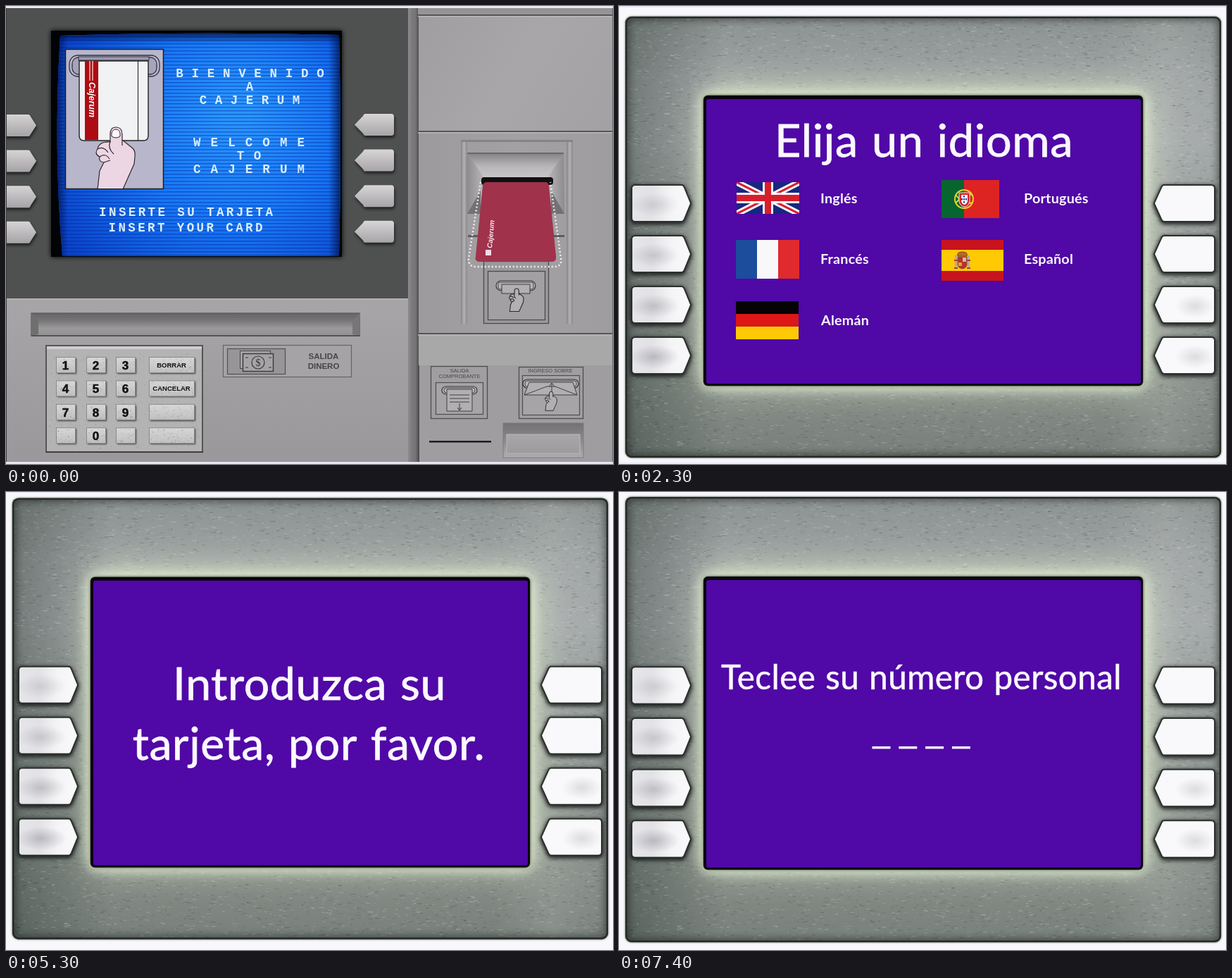
An HTML page with a canvas that plays this animation: 862x650 px, repeating every 8000 ms.

```html
<!DOCTYPE html>
<html lang="es">
<head>
<meta charset="utf-8">
<title>Cajero</title>
<style>
html, body { margin: 0; width: 100%; height: 100%; overflow: hidden; background: #f8f8fb; }
canvas { display: block; width: 862px; height: 650px; }
</style>
</head>
<body>
<canvas id="stage" width="862" height="650"></canvas>
<script>
const W = 862, H = 650, LOOP = 8000;
const BRAND = 'Cajerum';
let c;

function scene(draw) {
  const layer = document.createElement('canvas');
  layer.width = W;
  layer.height = H;
  c = layer.getContext('2d');
  draw();
  return layer;
}

function random(seed) {
  return () => {
    seed = (seed * 1664525 + 1013904223) % 4294967296;
    return seed / 4294967296;
  };
}

function blend(x0, y0, x1, y1, ...colors) {
  const g = c.createLinearGradient(x0, y0, x1, y1);
  colors.forEach((color, i) => g.addColorStop(i / (colors.length - 1), color));
  return g;
}

function rect(x, y, w, h, fill, stroke, line = 1) {
  if (fill) { c.fillStyle = fill; c.fillRect(x, y, w, h); }
  if (stroke) { c.strokeStyle = stroke; c.lineWidth = line; c.strokeRect(x, y, w, h); }
}

function shape(path, fill, stroke, line = 1) {
  const p = typeof path === 'string' ? new Path2D(path) : path;
  if (fill) { c.fillStyle = fill; c.fill(p); }
  if (stroke) { c.strokeStyle = stroke; c.lineWidth = line; c.stroke(p); }
}

function round(x, y, w, h, r) {
  const p = new Path2D();
  p.roundRect(x, y, w, h, r);
  return p;
}

function at(x, y, scale, draw, angle = 0) {
  c.save();
  c.translate(x, y);
  c.rotate(angle);
  c.scale(scale, scale);
  draw();
  c.restore();
}

function shadowed(color, blur, dx, dy, draw) {
  c.save();
  c.shadowColor = color;
  c.shadowBlur = blur;
  c.shadowOffsetX = dx;
  c.shadowOffsetY = dy;
  draw();
  c.restore();
}

function text(str, x, y, font, color, align = 'left') {
  c.font = font;
  c.fillStyle = color;
  c.textAlign = align;
  c.fillText(str, x, y);
}

function speckle(count, x, y, w, h, length, alpha, seed) {
  const rnd = random(seed);
  for (let i = 0; i < count; i++) {
    const tone = rnd() < 0.5 ? '255,255,255' : '25,35,32';
    c.fillStyle = `rgba(${tone},${rnd() * alpha})`;
    c.fillRect(x + rnd() * w, y + rnd() * h, 1 + rnd() * length, 1.3);
  }
}

// ---------- close-up of the display ----------

function label(str, x, y, size, weight = 400, align = 'left') {
  c.letterSpacing = size * 0.009 + 'px';
  c.wordSpacing = size * 0.025 + 'px';
  text(str, x, y, `${weight} ${size * 0.9}px Lato, sans-serif`, '#fbf8ff', align);
  if (weight === 400) {
    c.strokeStyle = '#fbf8ff';
    c.lineWidth = size * 0.011;
    c.strokeText(str, x, y);
  }
  c.letterSpacing = c.wordSpacing = '0px';
}

function pointer(base, shoulder, tip, y, h) {
  const d = Math.sign(tip - base) * 4;
  return `M${base + d} ${y}H${shoulder - d / 2}Q${shoulder} ${y} ${shoulder + d / 4} ${y + 3}` +
    `L${tip} ${y + h / 2}L${shoulder + d / 4} ${y + h - 3}Q${shoulder} ${y + h} ${shoulder - d / 2} ${y + h}` +
    `H${base + d}Q${base} ${y + h} ${base} ${y + h - 4}V${y + 4}Q${base} ${y} ${base + d} ${y}Z`;
}

function smudge(x, y, rx, ry, alpha) {
  c.save();
  c.translate(x, y);
  c.scale(rx, ry);
  const g = c.createRadialGradient(0, 0, 0, 0, 0, 1);
  g.addColorStop(0, `rgba(120,120,130,${alpha})`);
  g.addColorStop(1, 'rgba(120,120,130,0)');
  rect(-1, -1, 2, 2, g);
  c.restore();
}

function displayButtons() {
  for (let i = 0; i < 4; i++) {
    const y = 255 + i * 72;
    const left = pointer(19, 91, 101, y, 50);
    const right = pointer(845, 772, 761, y, 50);
    shadowed('#0e1210', 6, 0, 2, () => {
      shape(left, '#e6e6e8', '#2b302c', 4);
      shape(right, '#f9f9fb', '#2b302c', 4);
    });
    shape(left, blend(19, y, 101, y, '#e6e6ea', '#e2e2e6', '#f4f4f6', '#fafafc'));
    shape(right, '#f9f9fb');
    c.save();
    c.clip(new Path2D(left));
    smudge(50, y + 27, 36, 17, 0.22 + i * 0.06);
    c.restore();
    if (i > 1) smudge(818, y + 27, 28, 17, 0.22);
  }
}

function panel(top, scale) {
  rect(0, 0, W, H, '#f8f8fb');
  c.save();
  c.translate(0, top);
  c.scale(1, scale);
  const body = round(9, 15, 846, 626, 9);
  shadowed('#333a36', 3, 0, 0, () => shape(body, '#8c9290'));
  c.save();
  c.clip(body);
  rect(0, 0, W, H, blend(0, 14, 0, 642,
    '#8b9190', '#9fa3a4', '#a4a8a9', '#989d9c', '#8f9592', '#8b918d', '#858c87', '#78807b'));
  rect(0, 0, 150, H, blend(0, 0, 150, 0, 'rgba(35,50,43,.4)', 'rgba(35,50,43,.2)', 'rgba(35,50,43,0)'));
  rect(690, 0, 172, H, blend(690, 0, 862, 0, 'rgba(215,220,215,0)', 'rgba(215,220,215,.16)', 'rgba(190,196,192,0)'));
  speckle(15000, 0, 14, W, 630, 6, 0.2, 7);
  shadowed('#0d110f', 12, 0, 0, () => shape(body, null, '#262b28', 5));
  c.restore();
  const screen = round(120, 127, 624, 412, 6);
  shadowed('rgba(222,240,200,.8)', 50, 6, -6, () => shape(screen, '#dfebcf'));
  shadowed('rgba(240,250,225,.9)', 18, 0, 0, () => shape(screen, '#dfebcf', '#d9e6c8', 5));
  shadowed('#0c1408', 4, 0, 0, () => shape(screen, '#09040f'));
  shape(round(124, 132, 617, 404, 3), '#5008a6');
  displayButtons();
  c.restore();
}

function bands(x, y, w, h, colors, vertical) {
  const n = colors.length;
  colors.forEach((color, i) => vertical
    ? rect(x + w * i / n, y, w / n, h, color)
    : rect(x, y + h * i / n, w, h / n, color));
}

function unionFlag(x, y, w, h) {
  c.save();
  c.beginPath();
  c.rect(x, y, w, h);
  c.clip();
  rect(x, y, w, h, '#172780');
  const diagonals = `M${x} ${y}l${w} ${h}M${x + w} ${y}l${-w} ${h}`;
  const cross = `M${x + w / 2} ${y}v${h}M${x} ${y + h / 2}h${w}`;
  shape(diagonals, null, '#f7f7fa', 9);
  shape(diagonals, null, '#d81e2c', 3);
  shape(cross, null, '#f7f7fa', 15);
  shape(cross, null, '#d81e2c', 9);
  c.restore();
}

function portugal() {
  rect(458, 247, 82, 54, '#de2323');
  rect(458, 247, 32, 54, '#07652f');
  shape('M477 274a13 13 0 1 0 26 0a13 13 0 1 0-26 0M478 268q12 15 24 11M478 280q12-15 24-12', null, '#e8d32a', 2);
  shape('M483 265h15v12q-1 7-7.5 8q-6.500-1-7.500-8z', '#d9222b', '#f3e9d7', 1);
  shape('M486 268h9v9q-1 4-4.500 5q-3.500-1-4.500-5z', '#f8f8fa');
  for (const [x, y] of [[490, 269], [487, 273], [490, 273], [493, 273], [490, 277]]) rect(x - 1, y, 2, 2.5, '#23439b');
}

function spain() {
  rect(458, 332, 88, 58, '#c8131f');
  rect(458, 346, 88, 30, '#ffc904');
  rect(477, 354, 3, 18, '#bda99a');
  rect(495, 354, 3, 18, '#bda99a');
  shape('M476 361h5M494 361h5M476 372h5M494 372h5', null, '#a8402c', 2);
  shape('M481 356h13v12q-1 4-6.500 5q-5.500-1-6.500-5z', '#b6322c', '#8a5a2d');
  rect(488, 357, 5, 6, '#d6b7b0');
  rect(482, 364, 5, 5, '#e0a51d');
  shape('M481 355q-2-6 6.500-6q8.500 0 6.500 6z', '#b8672a', '#8a4223');
}

function languages() {
  panel(0, 1);
  rect(0, 0, W, 2, '#e9e6f5');
  rect(0, 647, W, 3, '#f0eef8');
  label('Elija un idioma', 433, 214, 72, 400, 'center');
  unionFlag(167, 250, 89, 45);
  bands(166, 332, 90, 55, ['#1c4d9d', '#f8f8fb', '#e02a2d'], true);
  bands(166, 419, 89, 54, ['#050304', '#dd1717', '#ffca05']);
  portugal();
  spain();
  label('Inglés', 286, 280, 22, 700);
  label('Francés', 286, 366, 22, 700);
  label('Alemán', 287, 453, 22, 700);
  label('Portugués', 575, 280, 22, 700);
  label('Español', 575, 366, 22, 700);
}

function insertCard() {
  panel(-6.3, 1);
  rect(0, 0, W, 1, '#e9e6f5');
  label('Introduzca su', 431, 295, 71.5, 400, 'center');
  label('tarjeta, por favor.', 430, 380, 71.5, 400, 'center');
}

function enterNumber() {
  panel(-8.2, 1.0097);
  label('Teclee su número personal', 429.5, 280, 52.8, 400, 'center');
  for (let i = 0; i < 4; i++) rect(359.5 + i * 37.8, 361, 26, 3.5, '#fbf8ff');
}

// ---------- the whole machine ----------

function mono(str, cx, y, pitch) {
  c.font = 'bold 17.5px "Liberation Mono", monospace';
  const advance = c.measureText('M').width;
  c.letterSpacing = pitch - advance + 'px';
  text(str, cx - (pitch * (str.length - 1) + advance) / 2, y, c.font, '#d9eeff');
  c.letterSpacing = '0px';
}

function hand(fill, line) {
  shape('M-8 10Q-8 0 0 0Q9 0 9 10V18L24 30Q28 34 27 42L26 52L10 88H-26L-23 62L-17 50Q-25 49-23 42Q-31 38-26 31Q-24 20-8 21Z',
    fill, '#30282d', line);
  shape('M-26 31Q-18 26-11 36M-23 42Q-15 36-9 45M-17 50L-8 47M-8 20Q-12 30-3 38M9 18V26', null, '#30282d', line);
}

function slotIcon(x, y, w, h) {
  shape(round(x, y, w, h, h / 2), '#b7b5b7', '#333', 1.2);
  shape(round(x + 3, y + 2, w - 6, h - 4, 3), null, '#444');
}

function screen() {
  shadowed('#000', 7, 0, 0, () => rect(64, 35, 413, 321, '#020306'));
  c.save();
  c.clip(new Path2D('M77 42Q270 36 473 41Q477 200 473 355H80Q67 200 77 42Z'));
  rect(60, 33, 420, 324, '#0a50df');
  const glow = c.createRadialGradient(330, 150, 20, 310, 190, 270);
  glow.addColorStop(0, '#2895ff');
  glow.addColorStop(0.5, '#1775f5');
  glow.addColorStop(1, '#0943c9');
  rect(60, 33, 420, 324, glow);
  for (let y = 38; y < 357; y += 5) rect(60, y, 420, 1.5, 'rgba(4,30,140,.42)');
  rect(60, 33, 420, 20, blend(0, 38, 0, 53, 'rgba(0,8,50,.75)', 'rgba(0,8,50,0)'));
  rect(68, 33, 20, 324, blend(68, 0, 88, 0, 'rgba(0,8,50,.8)', 'rgba(0,8,50,0)'));
  rect(458, 33, 20, 324, blend(458, 0, 477, 0, 'rgba(0,8,50,0)', 'rgba(0,8,50,.75)'));
  c.restore();

  rect(84.5, 61.5, 139, 198, '#b8b6ca', '#1c1c26', 1.5);
  shape(round(90, 70, 128, 30, 12), null, '#333344', 1.3);
  shape(round(94, 73, 120, 24, 9), '#a6a4ba', '#333344', 1.3);
  rect(103, 72, 100, 5, '#9d9bb0', '#333344');
  shape('M104 78H202V184Q202 191 195 191H111Q104 191 104 184Z', '#f1f2f3', '#222', 1.4);
  rect(112, 78, 19, 112, '#ad0d12');
  rect(118, 78, 2, 28, '#e58d8d');
  rect(122, 78, 2, 28, '#e58d8d');
  shape('M187.500 78V191', null, '#333', 1.2);
  at(118, 108, 1, () => text(BRAND, 0, 0, 'italic bold 12.5px "Liberation Sans", sans-serif', '#fff'), Math.PI / 2);
  c.save();
  c.beginPath();
  c.rect(85, 61, 138, 198);
  c.clip();
  at(156, 172, 1, () => hand('#ecd6e3', 1.2));
  shape('M150 181a6 6 0 1 1 12 0v4q-6 4-12 0z', '#fbf7fa', '#30282d', 1);
  c.restore();

  const name = BRAND.toUpperCase();
  mono('BIENVENIDO', 346.5, 101, 22.2);
  mono('A', 346, 120, 22);
  mono(name, 346, 139, 22);
  mono('WELCOME', 345, 199, 24.6);
  mono('TO', 345, 218, 24);
  mono(name, 345, 237, 24.6);
  mono('INSERTE SU TARJETA', 255.5, 298, 13.9);
  mono('INSERT YOUR CARD', 255, 320, 13.9);
}

function sideButtons() {
  for (let i = 0; i < 4; i++) {
    const y = 154 + i * 50.6;
    shadowed('#1c1e1d', 4, 1, 3, () => {
      shape(pointer(-6, 34, 43, y, 31), blend(0, y, 0, y + 31, '#d6d4d5', '#bdbbbd', '#a5a3a5'));
      shape(pointer(551, 508, 495, y - 1, 31), blend(0, y, 0, y + 31, '#d6d4d5', '#bdbbbd', '#a5a3a5'));
    });
  }
}

function keypad() {
  rect(57, 482, 222, 151, '#b4b3b3', '#565556', 2);
  rect(58, 483, 220, 4, '#cfcdce');
  rect(57, 632, 223, 2, '#3e3e3e');
  speckle(900, 59, 487, 218, 143, 1, 0.13, 21);
  const keys = ['1', '2', '3', 'BORRAR', '4', '5', '6', 'CANCELAR', '7', '8', '9', '', '', '0', '', ''];
  keys.forEach((key, i) => {
    const col = i % 4, y = 498 + Math.floor(i / 4) * 33.4;
    const x = [71, 114, 156, 203][col], w = col < 3 ? 27 : 64;
    shadowed('#3c3c3c', 2, 2, 2, () => rect(x, y, w, 22, '#bebdbd'));
    rect(x + 0.5, y + 0.5, w, 22, blend(0, y, 0, y + 22, '#d9d8d8', '#c0bfbf'), '#8b8a8a');
    speckle(w * 2, x + 1, y + 1, w - 3, 20, 1, 0.2, 90 + i);
    const font = col < 3 ? '900 17px "Liberation Sans", sans-serif' : 'bold 9.5px "Liberation Sans", sans-serif';
    text(key, x + w / 2, y + (col < 3 ? 18 : 15), font, '#111', 'center');
    if (col < 3) {
      c.strokeStyle = '#111';
      c.lineWidth = 0.5;
      c.strokeText(key, x + w / 2, y + 18);
    }
  });
}

function moneyArea() {
  rect(36, 436, 466, 32, blend(0, 436, 0, 468, '#666566', '#777677', '#9b999b', '#939193'), '#605f60', 1.5);
  shape('M36 436L46 447V466L36 468Z', '#706f70');
  shape('M502 436L492 447V466L502 468Z', '#777677');
  rect(36, 467, 467, 2, '#555455');
  rect(308.5, 481.5, 182, 45, '#a5a3a5', '#656465', 1.2);
  rect(314.5, 486.5, 82, 36, '#979597', '#525152', 1.2);
  rect(332.5, 489.5, 43, 25, '#a5a3a5', '#4a494a');
  rect(336.5, 493.5, 43, 25, '#a5a3a5', '#3a393a', 1.4);
  shape('M349 506a9 9 0 1 0 18 0a9 9 0 1 0-18 0M340 499h4M340 513h4M373 499h4M373 513h4', null, '#3a393a', 1.2);
  text('$', 358, 511, '14px "Liberation Serif", serif', '#333', 'center');
  const font = 'bold 11.5px "Liberation Sans", sans-serif';
  text('SALIDA', 451, 501, font, '#474647', 'center');
  text('DINERO', 451, 515, font, '#474647', 'center');
}

function cardReader() {
  for (const x of [646, 796]) rect(x, 191, 9, 260, blend(x, 0, x + 9, 0, '#858385', '#b4b2b4', '#8b898b'));
  rect(646, 190, 159, 3, '#858385');
  shape('M655 209H792L768 246H680Z', blend(0, 209, 0, 246, '#858385', '#b8b6b8', '#cac8ca'));
  shape('M655 209L680 246L674 295H655Z', blend(655, 0, 680, 0, '#8d8b8d', '#bcbabc'));
  shape('M792 209L768 246L774 295H793Z', blend(768, 0, 793, 0, '#bcbabc', '#8d8b8d'));
  shape('M655 295L674 262V295ZM793 295L774 262V295Z', '#737173');
  shape('M655 209H792', null, '#6a686a', 2);
  rect(656, 325, 137, 3, '#5e5c5e');
  shape(round(675, 243, 102, 11, 4), '#121012');
  rect(678.5, 362.5, 92, 88, '#9b999b', '#4c4a4c', 1.3);
  rect(684.5, 376.5, 81, 69, '#a2a0a2', '#4c4a4c', 1.3);
  slotIcon(696, 390, 56, 14);
  rect(704, 395, 40, 13, '#b2b0b2', '#3c3a3c');
  at(725, 401, 0.37, () => hand('#b2b0b2', 3));
  c.save();
  c.setLineDash([2, 3]);
  shape('M674 250L657 358Q656 370 668 370H778Q790 370 788 358L773 250', null, '#efedf0', 2.5);
  c.restore();
  shape('M683 250H766Q770 250 771 255L781 355Q782 363 775 363H673Q665 363 667 355L677 255Q678 250 683 250Z', '#a1324c');
  at(690, 344, 1, () => text(BRAND, 0, 0, 'italic bold 10px "Liberation Sans", sans-serif', '#f6eaf0'), -1.48);
  rect(681, 346, 8, 8, '#f0dde4');
}

function paperSlots() {
  const font = '7.5px "Liberation Sans", sans-serif';
  rect(603.5, 511.5, 80, 74, '#a09ea0', '#4f4d4f', 1.3);
  text('SALIDA', 644, 520, font, '#4b494b', 'center');
  text('COMPROBANTE', 644, 528, font, '#4b494b', 'center');
  rect(610.5, 534.5, 67, 45, '#a6a4a6', '#4f4d4f', 1.2);
  slotIcon(619, 540, 50, 11);
  shape('M626 544H662V575H626ZM630 552H658M630 557H658M630 562H658M644 564V573M641 570L644 574L647 570', '#b1afb1', '#413f41');
  rect(728.5, 512.5, 91, 73, '#a09ea0', '#4f4d4f', 1.3);
  text('INGRESO SOBRE', 773, 520, font, '#4b494b', 'center');
  rect(733.5, 524.5, 81, 56, '#a6a4a6', '#4f4d4f', 1.2);
  slotIcon(734, 530, 79, 12);
  shape('M743 534H805L811 552H736ZM736 552L768 540H780L811 552M775 548V536M771 540L775 535L779 540', '#b1afb1', '#413f41');
  at(774, 547, 0.31, () => hand('#b1afb1', 3));
  rect(601, 617, 88, 2.5, '#1d1b1d');
  rect(706, 592, 114, 49, blend(0, 592, 0, 641, '#737173', '#8b898b', '#aeacae'), '#7d7b7d');
  rect(711, 608, 104, 27, blend(0, 608, 0, 635, '#a9a7a9', '#9c9a9c'), '#bcbabc');
}

function machine() {
  rect(0, 0, W, H, '#9f9d9f');
  rect(0, 415, 571, 232, blend(0, 415, 0, 647, '#a7a5a7', '#a09ea0', '#9a989a'));
  rect(0, 3, 571, 412, '#4e514f');
  rect(0, 415, 571, 2, '#b4b2b4');
  rect(571, 3, 16, 644, blend(571, 0, 587, 0, '#8d8b8d', '#7c7a7c', '#757375', '#474547'));
  rect(585, 3, 277, 10, '#969496');
  rect(586, 14, 275, 163, blend(586, 14, 861, 177, '#a09ea0', '#a8a6a8', '#a3a1a3'));
  rect(586, 180, 275, 284, blend(586, 0, 861, 0, '#9c9a9c', '#a3a1a3', '#9e9c9e'));
  rect(586, 467, 275, 43, '#a9a8a8');
  for (const y of [12, 177, 464]) {
    rect(585, y, 277, 2, '#565456');
    rect(585, y + 2, 277, 1.5, '#bbb9bb');
  }
  screen();
  sideButtons();
  moneyArea();
  keypad();
  cardReader();
  paperSlots();
  rect(0, 0, 1, H, '#3f3f42');
  rect(861, 0, 1, H, '#6c6a6e');
  rect(0, 0, W, 3, '#eae9f3');
  rect(0, 647, W, 3, '#e8e7f1');
}

const timeline = [[6500, enterNumber], [3500, insertCard], [500, languages], [0, machine]]
  .map(([start, draw]) => ({ start, layer: scene(draw) }));
const stage = document.getElementById('stage').getContext('2d');
const origin = performance.now();

function render() {
  const t = (performance.now() - origin) % LOOP;
  stage.drawImage(timeline.find(part => t >= part.start).layer, 0, 0);
  requestAnimationFrame(render);
}
render();
</script>
</body>
</html>
```
